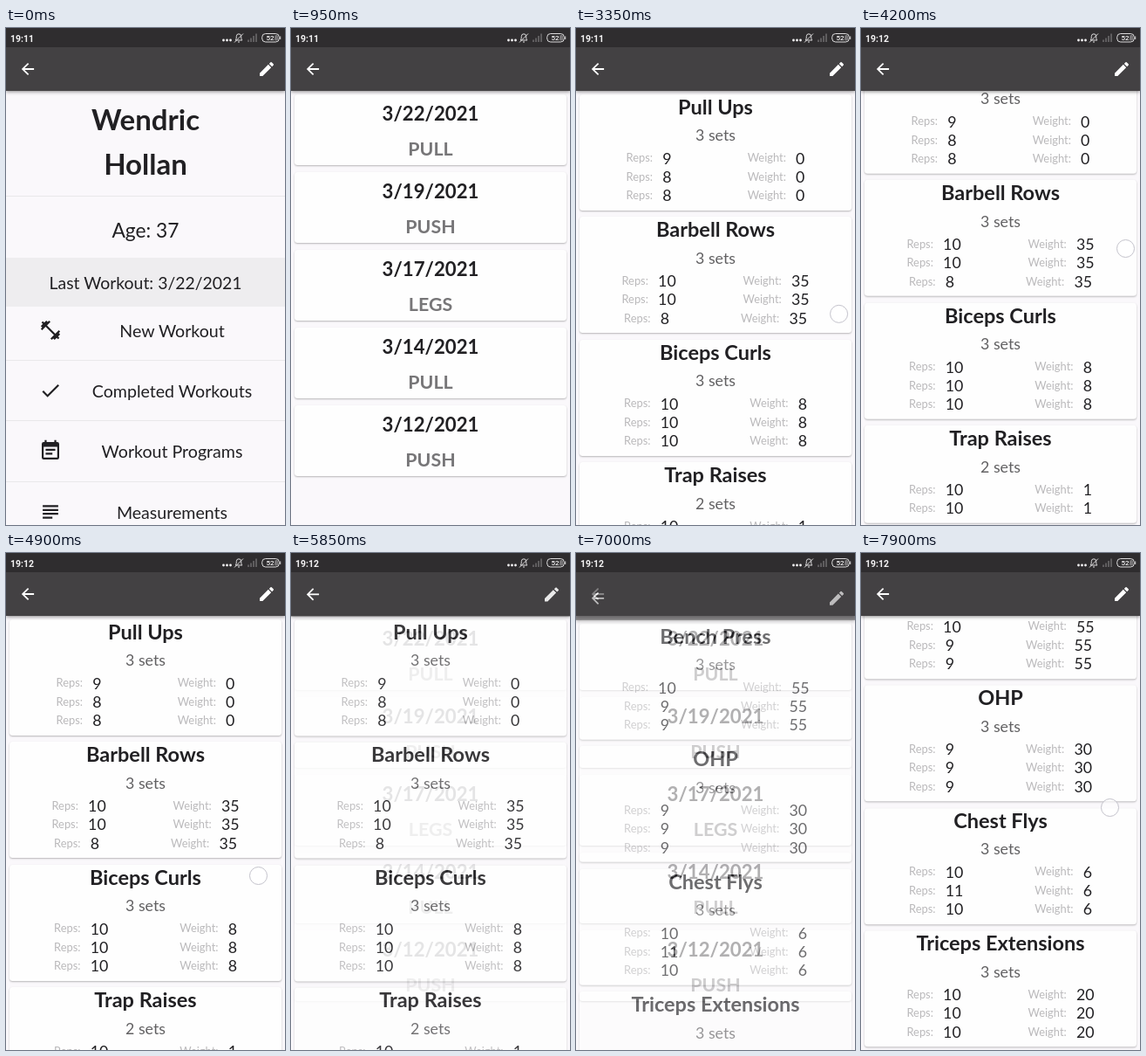
Write an HTML page that moves like this. It is 320 px wide and 569 px high and loops after 8000 ms.

```html
<!DOCTYPE html>
<html lang="en">
<head>
<meta charset="utf-8">
<title>Workout log</title>
<style>
  html, body { margin: 0; width: 100%; height: 100%; overflow: hidden; background: #faf8fb; }
  #stage { position: relative; width: 320px; height: 569px; overflow: hidden;
    font: 400 17.78px/1.2 Lato, sans-serif; color: #212023; }
  .page { position: absolute; inset: 0; background: #faf8fb; overflow: hidden; }
  .bar { position: absolute; inset: 0 0 auto; height: 72px; background: #434143;
    box-shadow: 0 1px 4px rgba(0, 0, 0, .45); }
  .icon { position: absolute; transform: translate(-50%, -50%); fill: currentColor; }
  .bar .icon { color: #fff; top: 47px; }
  .scroller { position: absolute; top: 72px; left: 0; right: 0; }
  .card { margin: 3.55px 3.55px 7.11px; border-radius: 3.5px; background: #fefefe; text-align: center;
    box-shadow: 0 1px 2px rgba(0, 0, 0, .27); overflow: hidden; }
  .card b { display: block; position: relative; top: 1px; font-size: 23.5px; line-height: 27.7px; }
  .workout { box-sizing: border-box; height: 81.9px; padding: 7.1px 0; }
  .workout b { font-size: 22.2px; }
  .workout b + b { margin-top: 13.3px; font-size: 21.4px; line-height: 26.7px; color: #777678; }
  .exercise { padding-bottom: 6.4px; }
  .sets { margin: 8.9px 0 5.1px; color: #616062; }
  .row { display: flex; justify-content: space-around; width: 292px; margin: 0 auto; }
  .row span { display: flex; align-items: center; }
  .row i { font-style: normal; font-size: 12.9px; color: #bab9bb; margin-right: 11.2px; }
  .line { position: absolute; white-space: nowrap; transform: translateX(-50%); }
  .rule { position: absolute; left: 0; right: 0; height: 1px; background: #e9e8ea; }
  .band { position: absolute; left: 0; right: 0; top: 263px; height: 56px; background: #eeedef; }
  #status { position: absolute; left: 0; top: 0; background: #2f2d2f; }
  #touch { position: absolute; left: -10.5px; top: -10.5px; box-sizing: border-box; width: 21px; height: 21px;
    border-radius: 50%; border: 1px solid #c3c2cb; background: rgba(255, 255, 255, .6); }
</style>
</head>
<body>
<div id="stage">
  <svg id="status" width="320" height="22" fill="#f4f3f4" font-family="Roboto, sans-serif">
    <text id="clock" x="5" y="15.5" font-size="10.5" font-weight="700">19:11</text>
    <circle cx="249.500" cy="14" r="1.400"/><circle cx="253.500" cy="14" r="1.400"/><circle cx="257.500" cy="14" r="1.400"/>
    <g fill="none" stroke="#dddcdd">
      <path d="M263 14h8c-1-1-1.3-2-1.3-4.5a2.7 2.7 0 0 0-5.4 0c0 2.5-.3 3.5-1.3 4.5M266 16h2M262 16.5L272 6.500"/>
      <path stroke="#6b696b" stroke-width="1.600" d="M278 16v-2.500M281 16v-4.500M284 16v-7M287 16v-9.500"/>
      <rect x="293.700" y="6.500" width="19.600" height="9.500" rx="4"/>
      <path d="M314.700 9.500v3.500"/>
    </g>
    <rect x="308" y="8" width="4" height="6.500" rx="1.500" fill="#777577"/>
    <text x="303" y="14.200" font-size="8" font-weight="500" text-anchor="middle">52</text>
  </svg>
  <div id="touch"></div>
</div>
<script>
const icons = {
  back: "M20 11H7.83l5.59-5.59L12 4l-8 8 8 8 1.41-1.41L7.83 13H20z",
  edit: "M3 17.25V21h3.75L17.81 9.94l-3.75-3.75zM20.71 7.04a1 1 0 0 0 0-1.41l-2.34-2.34a1 1 0 0 0-1.41 0l-1.83 1.83 3.75 3.75z",
  dumbbell: "M20.57 14.86L22 13.43 20.57 12 17 15.57 8.43 7 12 3.43 10.57 2 9.14 3.43 7.71 2 5.57 4.14 4.14 2.71 2.71 4.14l1.43 1.43L2 7.71l1.43 1.43L2 10.57 3.43 12 7 8.43 15.57 17 12 20.57 13.43 22l1.43-1.43L16.29 22l2.14-2.14 1.43 1.43 1.43-1.43-1.43-1.43L22 16.29z",
  check: "M9 16.17L4.83 12l-1.42 1.41L9 19 21 7l-1.41-1.41z",
  calendar: "M17 10H7v2h10zm2-7h-1V1h-2v2H8V1H6v2H5a2 2 0 0 0-2 2v14a2 2 0 0 0 2 2h14a2 2 0 0 0 2-2V5a2 2 0 0 0-2-2zm0 16H5V8h14zm-5-5H7v2h7z",
  lines: "M14 17H4v2h10zm6-8H4v2h16zM4 15h16v-2H4zM4 5v2h16V5z"
};
const $ = id => document.getElementById(id);

const icon = (name, x, y, size) =>
  `<svg class="icon" style="left:${x}px;top:${y}px" width="${size}" height="${size}" viewBox="0 0 24 24"><path d="${icons[name]}"/></svg>`;
const line = (text, x, baseline, size, weight = 400) =>
  `<div class="line" style="left:${x}px;top:${baseline - .987 * size}px;font-size:${size}px;font-weight:${weight}">${text}</div>`;
const rule = y => `<div class="rule" style="top:${y}px"></div>`;

const workout = ([date, kind]) => `<div class="card workout"><b>${date}</b><b>${kind}</b></div>`;
const exercise = ([name, weight, ...reps]) => `<div class="card exercise"><b>${name}</b>
  <div class="sets">${reps.length} sets</div>${reps.map(n =>
    `<div class="row"><span><i>Reps:</i>${n}</span><span><i>Weight:</i>${weight}</span></div>`).join("")}</div>`;
const scroller = cards => `<div class="scroller">${cards.join("")}</div>`;

function addPage(content, editable) {
  const page = document.createElement("div");
  page.className = "page";
  page.innerHTML = content + `<div class="bar">${icon("back", 25, 47, 21.33)}${editable ? icon("edit", 299, 47, 21.33) : ""}</div>`;
  $("stage").insertBefore(page, $("status"));
  return page;
}

const tiles = [["dumbbell", "New Workout"], ["check", "Completed Workouts"],
  ["calendar", "Workout Programs"], ["lines", "Measurements"]];

addPage(
  line("Wendric", 160, 117.3, 33, 700) + line("Hollan", 160, 168.3, 33, 700) + rule(192) +
  line("Age: 37", 160, 241, 22.8) + `<div class="band"></div>` +
  line("Last Workout: 3/22/2021", 160, 298.8, 19.4) +
  tiles.map(([name, label], i) => {
    const y = 346 + 69.3 * i;
    return icon(name, 51, y - .3, 26.67) + line(label, 190.5, y + 8.2, 19.6) + (i < 3 ? rule(Math.round(y + 34)) : "");
  }).join(""), true);

const history = addPage(scroller([["3/22/2021", "PULL"], ["3/19/2021", "PUSH"], ["3/17/2021", "LEGS"],
  ["3/14/2021", "PULL"], ["3/12/2021", "PUSH"]].map(workout)));
const pull = addPage(scroller([["Pull Ups", 0, 9, 8, 8], ["Barbell Rows", 35, 10, 10, 8],
  ["Biceps Curls", 8, 10, 10, 10], ["Trap Raises", 1, 10, 10]].map(exercise)), true);
const push = addPage(scroller([["Bench Press", 55, 10, 9, 9], ["OHP", 30, 9, 9, 9],
  ["Chest Flys", 6, 10, 11, 10], ["Triceps Extensions", 20, 10, 10, 10]].map(exercise)), true);

const clamp = (v, lo = 0, hi = 1) => Math.min(hi, Math.max(lo, v));

function bezier(x1, y1, x2, y2) {
  const at = (a, b, s) => 3 * (1 - s) * (1 - s) * s * a + 3 * (1 - s) * s * s * b + s * s * s;
  return x => {
    let lo = 0, hi = 1;
    for (let i = 0; i < 20; i++) {
      const mid = (lo + hi) / 2;
      if (at(x1, x2, mid) < x) lo = mid; else hi = mid;
    }
    return at(y1, y2, lo);
  };
}
const easeIn = bezier(.42, 0, 1, 1);
const fastOutSlowIn = bezier(.4, 0, .2, 1);

// Pages rise a quarter of the screen while fading in; closing runs the same in reverse.
function showPage(page, t, openAt, closeAt = Infinity) {
  const v = Math.min(clamp((t - openAt) / 300), clamp((closeAt + 300 - t) / 300));
  page.style.visibility = v > 0 ? "visible" : "hidden";
  page.style.opacity = easeIn(v);
  page.style.transform = `translateY(${(1 - fastOutSlowIn(v)) * 142}px)`;
}

// Each gesture lists [time, x, y] stops.
const gestures = [
  [[500, 250, 417], [600, 250, 417]],
  [[2050, 262, 120], [2150, 262, 120]],
  [[3250, 301, 332], [3850, 302, 264], [4050, 302, 264], [4200, 303, 252],
   [4350, 303, 252], [4900, 289, 369], [5100, 288, 380], [5250, 288, 380]],
  [[6650, 262, 208], [6750, 262, 208]],
  [[7480, 288, 378], [7900, 285, 291], [8000, 285, 291]]
];

function gesturePoint(stops, t) {
  const last = stops[stops.length - 1];
  if (t >= last[0]) return last.slice(1);
  const i = Math.max(1, stops.findIndex(s => t <= s[0]));
  const [a, b] = [stops[i - 1], stops[i]];
  const u = clamp((t - a[0]) / (b[0] - a[0]));
  const k = u * u * (3 - 2 * u);
  return [a[1] + (b[1] - a[1]) * k, a[2] + (b[2] - a[2]) * k];
}

// The list follows the finger once it passes the grip height.
function scrollPage(page, stops, t, grip, max) {
  const y = t < stops[0][0] ? grip : gesturePoint(stops, t)[1];
  page.querySelector(".scroller").style.transform = `translateY(${-clamp(grip - y, 0, max)}px)`;
}

function draw() {
  const t = performance.now() % 8000;
  $("clock").textContent = t < 3500 ? "19:11" : "19:12";
  showPage(history, t, 600);
  showPage(pull, t, 2170, 5830);
  showPage(push, t, 6770);
  scrollPage(pull, gestures[2], t, 294.3, 42.3);
  scrollPage(push, gestures[4], t, 355.8, 64.8);

  const active = gestures.find(g => t >= g[0][0] && t <= g[g.length - 1][0]);
  $("touch").style.display = active ? "block" : "none";
  if (active) {
    const [x, y] = gesturePoint(active, t);
    $("touch").style.transform = `translate(${x}px, ${y}px)`;
  }
  requestAnimationFrame(draw);
}
draw();
</script>
</body>
</html>
```
